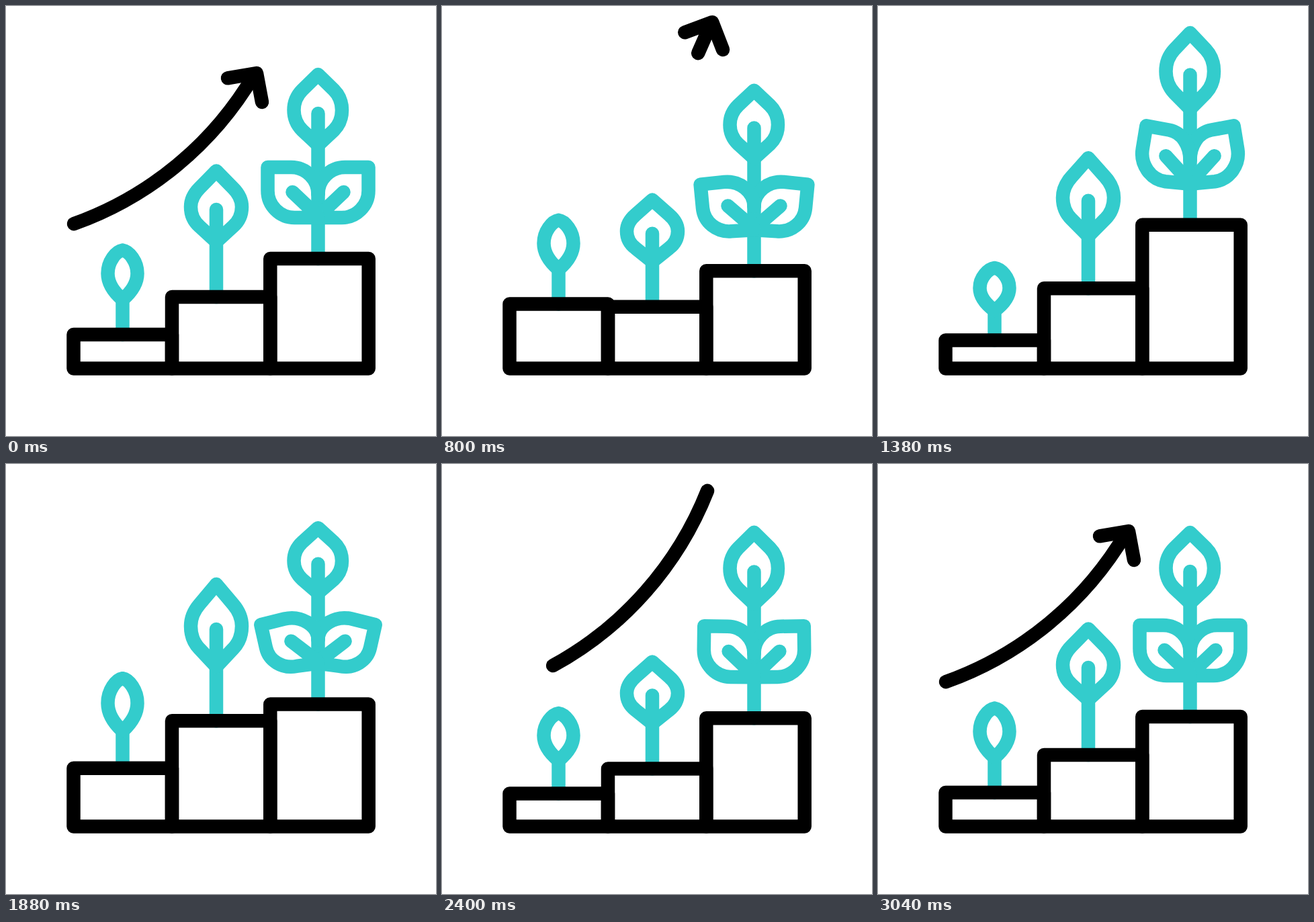
Recreate the animation shown at these times as an HTML page. Size 640 by 640 pixels, loop 3240 ms.

```html
<!DOCTYPE html>
<html lang="en">
<head>
<meta charset="utf-8">
<title>Growth steps</title>
<style>
  html, body { margin: 0; width: 100%; height: 100%; overflow: hidden; background: #fff; }
  svg { display: block; width: 100vw; height: 100vh; }
  path { fill: none; stroke-width: 20.5; stroke-linecap: round; stroke-linejoin: round; vector-effect: non-scaling-stroke; }
  .plant { stroke: #33cccc; }
  .ink { stroke: #000; }
</style>
</head>
<body>
<svg id="stage" viewBox="0 0 640 640"></svg>
<script>
const LOOP = 3240;
const FLOOR = 539.5;
const stage = document.getElementById('stage');

function add(tag, parent, attrs = {}) {
  const node = document.createElementNS('http://www.w3.org/2000/svg', tag);
  for (const name in attrs) node.setAttribute(name, attrs[name]);
  return parent.appendChild(node);
}

// Sine-eased value through a row of key times and levels.
function track(time, times, levels) {
  if (time <= times[0]) return levels[0];
  for (let i = 1; i < times.length; i++) {
    if (time < times[i]) {
      const p = (time - times[i - 1]) / (times[i] - times[i - 1]);
      return levels[i - 1] + (levels[i] - levels[i - 1]) * (1 - Math.cos(Math.PI * p)) / 2;
    }
  }
  return levels[levels.length - 1];
}

// Every part rests, swings low and high, and comes back to rest.
const swing = (rest, low, high) => [rest, low, high, low, high, low, rest];
const LIFT = swing(0, 20.5, -51);
const LEAN = swing(0, -20, 10.4);

const steps = [
  {
    left: 100.5, right: 247, top: 489, x: 173.5, join: 437,
    bloom: 'M173.5 363.5C164 365 151.5 380 151.5 398C151.5 414 163 428 173.5 437' +
           'C184 428 195.5 414 195.5 398C195.5 380 183 365 173.5 363.5Z',
    stemScale: swing(1, .85, 1.07), bloomScale: swing(1, .86, 1.07),
    liftTimes: [220, 440, 880, 1250, 1740, 2210, 2440],
    bendTimes: [320, 540, 980, 1350, 1840, 2220, 2520]
  },
  {
    left: 247, right: 393.3, top: 433, x: 313, join: 351,
    bloom: 'M313 245.5L288 271C279 280 275 288 275 299C275 312 280 321 288 328L313 351' +
           'L338 328C346 321 351 312 351 299C351 288 347 280 338 271ZM313 303V351',
    stemScale: swing(1, .82, .98), bloomScale: swing(1, .87, 1.165),
    liftTimes: [440, 720, 1160, 1583, 1890, 2400, 2640],
    bendTimes: [540, 810, 1260, 1660, 1890, 2400, 2650]
  },
  {
    left: 393.3, right: 539.7, top: 376, x: 464.5, join: 207,
    bloom: 'M464.5 102L441 125C433 133 428.5 143 428.5 155C428.5 167 433 177 441 185L464.5 207' +
           'L488 185C496 177 500 167 500 155C500 143 496 133 488 125ZM464.5 160V207',
    stemScale: swing(1, .965, 1.023), bloomScale: swing(1, .87, 1.085),
    liftTimes: [620, 850, 1360, 1680, 2060, 2575, 2960],
    bendTimes: [640, 1100, 1420, 1735, 2180, 2760, 2960],
    leafy: true
  }
];

for (const step of steps) {
  step.stem = add('path', stage, { class: 'plant' });
  step.flower = add('path', stage, { class: 'plant', d: step.bloom });
  if (step.leafy) step.leaves = [1, -1].map(side => ({ side, path: add('path', stage, { class: 'plant' }) }));
}
for (const step of steps) step.box = add('path', stage, { class: 'ink' });

const arrow = add('g', stage);
const shaft = add('path', arrow, { class: 'ink' });
const head = add('path', arrow, { class: 'ink' });

// Right leaf outline and vein, relative to its pivot on the stem.
function leafPath(lean) {
  const at = (x, y, weight = 1) => {
    const a = -lean * weight * Math.PI / 180;
    const px = x * Math.cos(a) - y * Math.sin(a);
    const py = x * Math.sin(a) + y * Math.cos(a);
    return px.toFixed(2) + ' ' + py.toFixed(2) + ' ';
  };
  return 'M' + at(0, 20, 0) + 'L' + at(35, 20, .6) +
    'C' + at(57, 20, .7) + at(75, 2, .9) + at(75, -20) +
    'L' + at(75, -55) + 'L' + at(40, -55, .9) +
    'C' + at(18, -55, .7) + at(0, -37, 0) + at(0, -15, 0) +
    'M' + at(38, -18, .6) + 'L' + at(1, 17, 0);
}

function drawStep(step, time) {
  const top = step.top + track(time, step.liftTimes, LIFT);
  step.box.setAttribute('d', `M${step.left} ${top}H${step.right}V${FLOOR}H${step.left}Z`);

  const join = top - (step.top - step.join) * track(time, step.bendTimes, step.stemScale);
  const stretch = track(time, step.bendTimes, step.bloomScale);
  step.stem.setAttribute('d', `M${step.x} ${join}V${top}`);
  step.flower.setAttribute('transform', `translate(0 ${join}) scale(1 ${stretch}) translate(0 ${-step.join})`);

  if (step.leafy) {
    const d = leafPath(track(time, step.bendTimes, LEAN));
    for (const leaf of step.leaves) {
      leaf.path.setAttribute('d', d);
      leaf.path.setAttribute('transform', `translate(${step.x} ${top - 81}) scale(${leaf.side} 1)`);
    }
  }
}

// The arrow swings around HUB; its shaft is an arc of a slightly larger circle.
const HUB = { x: -20, y: -95 };
const ARC = { x: -70.4, y: -156.1, r: 510 };
const TAIL = 70.35, NOSE = 30.55;
const TIP = [373, 100], BARBS = [[330, 107.3], [381, 143]];

function onArc(degrees) {
  const a = degrees * Math.PI / 180;
  return `${ARC.x + ARC.r * Math.cos(a)} ${ARC.y + ARC.r * Math.sin(a)}`;
}

function show(node, visible) {
  node.setAttribute('visibility', visible ? 'visible' : 'hidden');
}

function drawArrow(time) {
  const leaving = time < 1500;
  const turn = leaving
    ? track(time, [220, 430, 830], [0, 10.4, -10.9])
    : track(time, [2050, 2485, 2760, 3040], [10.4, -10.9, 5, 0]);
  arrow.setAttribute('transform', `rotate(${turn} ${HUB.x} ${HUB.y})`);

  const from = leaving ? track(time, [460, 905], [TAIL, NOSE]) : TAIL;
  const to = leaving ? NOSE : track(time, [2110, 2395], [TAIL, NOSE]);
  shaft.setAttribute('d', `M${onArc(from)}A${ARC.r} ${ARC.r} 0 0 0 ${onArc(to)}`);
  show(shaft, from - to > .05);

  const size = leaving ? track(time, [810, 920], [1, 0]) : track(time, [2400, 2540], [0, 1]);
  const [a, b] = BARBS.map(barb => barb.map((v, i) => TIP[i] + (v - TIP[i]) * size).join(' '));
  head.setAttribute('d', `M${a}L${TIP.join(' ')}L${b}`);
  show(head, size > .01);
}

function render(time) {
  for (const step of steps) drawStep(step, time);
  drawArrow(time);
}

const start = performance.now();
function tick() {
  render((performance.now() - start) % LOOP);
  requestAnimationFrame(tick);
}
render(0);
requestAnimationFrame(tick);
</script>
</body>
</html>
```
